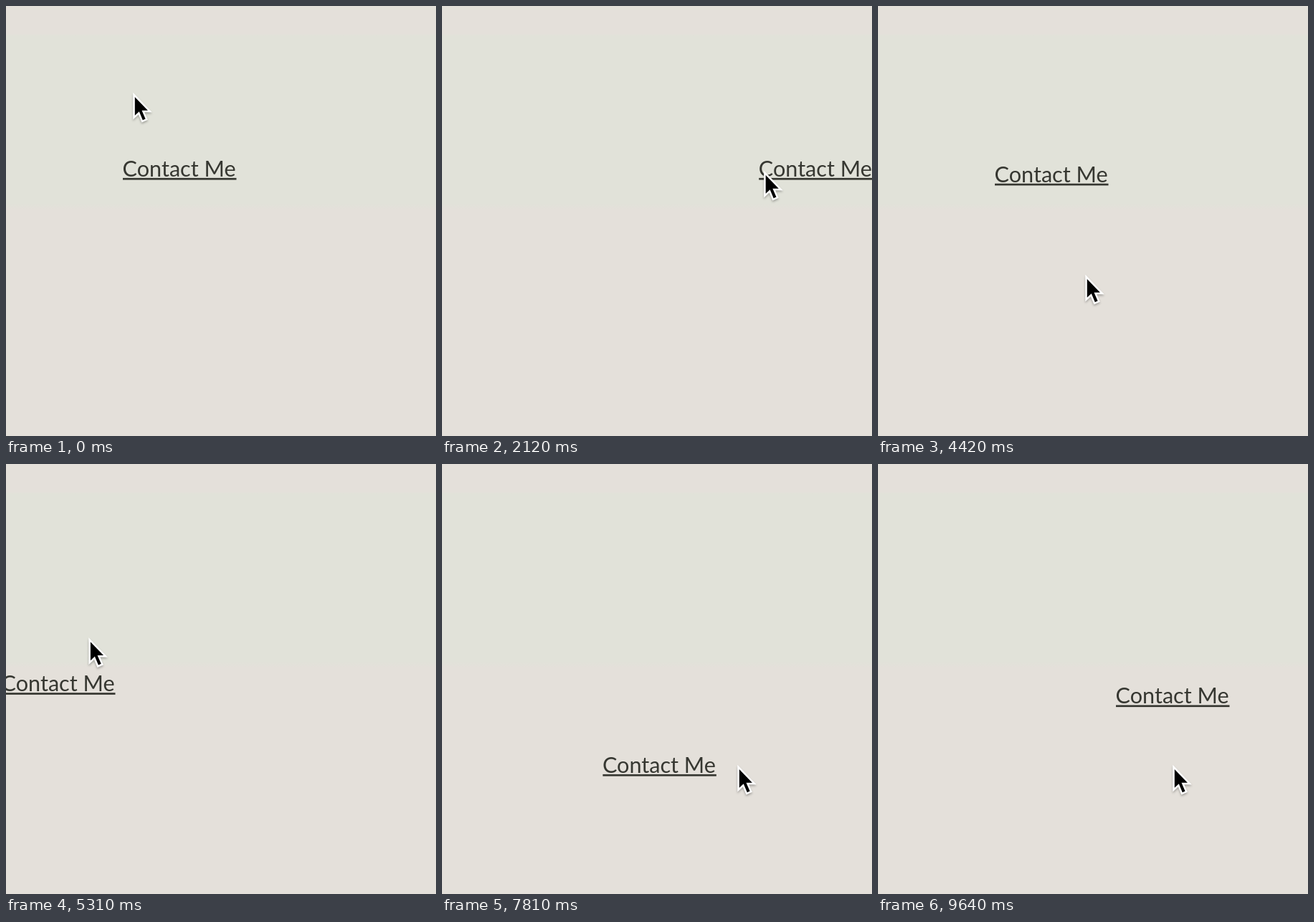
An HTML page that plays this animation: 600 by 600 pixels, repeating every 9710 ms.

```html
<!DOCTYPE html>
<html lang="en">
<head>
<meta charset="utf-8">
<title>Runaway link</title>
<style>
  html, body { margin: 0; width: 100%; height: 100%; overflow: hidden; background: #e4e0da; }
  svg { display: block; width: 600px; height: 600px; }
  text { font: 400 30.6px Lato, "Open Sans", sans-serif; }
  #link { fill: #363731; }
  #cursor { filter: drop-shadow(0 2px 1.5px rgba(0, 0, 0, .28)); }
  #cursor path { stroke: #fff; stroke-width: 5; paint-order: stroke; }
</style>
</head>
<body>
<svg viewBox="0 0 600 600">
  <defs>
    <linearGradient id="wash" x1="0" y1="0" x2="0" y2="1">
      <stop offset=".064" stop-color="#e4e0da"/>
      <stop offset=".07" stop-color="#e1e2d9"/>
      <stop offset=".46" stop-color="#e1e2d9"/>
      <stop offset=".472" stop-color="#e4e0da"/>
    </linearGradient>
  </defs>
  <rect width="600" height="600" fill="url(#wash)"/>
  <g id="link">
    <text x="-.4" y="-2.6">Contact Me</text>
    <rect y="-.6" width="158.5" height="2.7"/>
  </g>
  <g id="cursor">
    <path d="M2.8 6V31.8L8.8 26.2L13.8 38.2L17.6 36.5L12.5 24.7H20.9Z"/>
  </g>
</svg>
<script>
const LOOP = 9710;
const SLIDE = 300;
const LEAD = 85; // the link flees just before the pointer reaches its key point
const CELL = { x: 169, y: 96.5 };
const HOME = { x: 163, y: 240.5 };
const DIRS = { L: [-1, 0], R: [1, 0], U: [0, -1], D: [0, 1] };

// Pointer key points: time, x, y and the way the link hops, if it does.
const keys = [
  [40, 177, 121], [375, 215, 225, "R"], [705, 360, 245, "R"], [960, 480, 293],
  [1315, 540, 212, "L"], [1540, 408, 246], [1920, 408, 246], [2117, 448, 230, "R"],
  [2555, 550, 230, "D"], [2880, 564, 336, "L"], [3120, 489, 335], [3215, 465, 312, "U"],
  [3525, 450, 222, "L"], [3985, 314, 230, "D"], [4336, 291, 367, "U"], [4420, 289, 375],
  [4875, 275, 228, "L"], [5265, 115, 235, "D"], [5555, 118, 345, "D"], [6225, 141, 431, "R"],
  [6810, 267, 432, "R"], [7000, 267, 432], [7480, 405, 528], [7810, 412, 420, "L"],
  [8300, 300, 482], [8915, 215, 437, "R"], [9425, 411, 428, "U"], [9600, 411, 420]
];

const easeOut = p => 1 - (1 - p) ** 3;
const clamp = p => Math.min(1, Math.max(0, p));

function linkAt(t) {
  let { x, y } = HOME;
  for (const [at, , , way] of keys) {
    if (!way) continue;
    const p = easeOut(clamp((t - at + LEAD) / SLIDE));
    x += DIRS[way][0] * CELL.x * p;
    y += DIRS[way][1] * CELL.y * p;
  }
  return [x, y];
}

const slope = (i, k) => (keys[i + 1][k] - keys[i][k]) / (keys[i + 1][0] - keys[i][0]);

// Monotone tangent: smooth through points, flat at turns and rests.
function tangent(i, k) {
  if (i === 0 || i === keys.length - 1) return 0;
  const a = slope(i - 1, k), b = slope(i, k);
  return a * b > 0 ? 2 * a * b / (a + b) : 0;
}

function cursorAt(t) {
  const next = keys.findIndex(key => key[0] > t);
  if (next < 1) return keys.at(next).slice(1, 3);
  const a = keys[next - 1], b = keys[next];
  const span = b[0] - a[0];
  const u = (t - a[0]) / span, v = 1 - u;
  return [1, 2].map(k =>
    a[k] * v * v * (1 + 2 * u) + b[k] * u * u * (3 - 2 * u) +
    span * u * v * (v * tangent(next - 1, k) - u * tangent(next, k)));
}

const link = document.getElementById("link");
const cursor = document.getElementById("cursor");
const place = (el, [x, y]) => el.setAttribute("transform", `translate(${x.toFixed(2)} ${y.toFixed(2)})`);

const start = performance.now();
function draw() {
  const t = (performance.now() - start) % LOOP;
  place(link, linkAt(t));
  place(cursor, cursorAt(t));
  requestAnimationFrame(draw);
}
draw();
</script>
</body>
</html>
```
